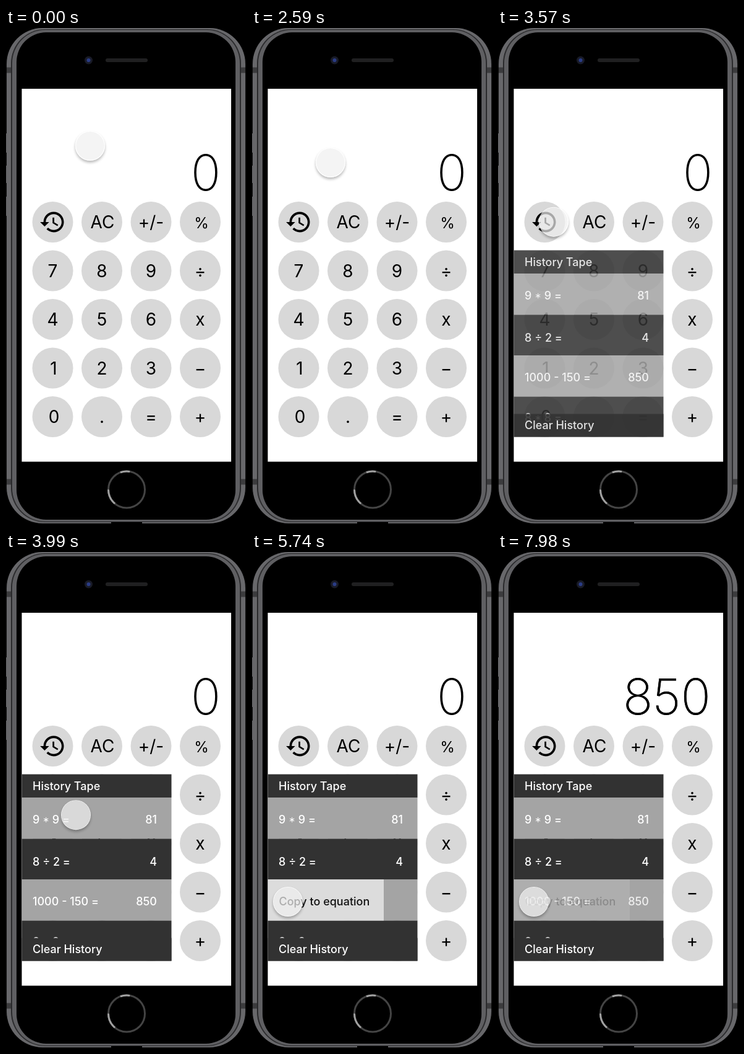
These frames come from a looping animation (388 by 800 pixels, 8000 ms). An HTML page:

```html
<!DOCTYPE html>
<html lang="en">
<head>
<meta charset="utf-8">
<title>Calculator history</title>
<style>
  html, body { margin: 0; width: 100%; height: 100%; overflow: hidden; background: #000; }
  svg { position: absolute; left: 0; top: 0; }
  text { font-family: Inter, Roboto, sans-serif; }
  .key { font-size: 28px; text-anchor: middle; }
  .display { font-size: 80px; font-weight: 200; }
  .tape text { font-size: 18px; font-weight: 500; fill: #fff; }
  .tape .value { text-anchor: end; }
  .times { font-size: 13px; baseline-shift: 2px; }
  #touch {
    position: absolute; left: -24px; top: -24px; width: 48px; height: 48px;
    box-sizing: border-box; border: 1.5px solid rgba(255, 255, 255, .85); border-radius: 50%;
    background: rgba(240, 240, 240, .7); background-clip: padding-box;
    box-shadow: 0 3px 4px rgba(0, 0, 0, .28);
  }
</style>
</head>
<body>
<svg width="388" height="800" viewBox="0 0 388 800">
  <defs>
    <clipPath id="screen"><rect x="25.5" y="98" width="338.5" height="601.5"/></clipPath>
  </defs>

  <!-- phone body -->
  <g fill="#58585b">
    <rect y="170" width="3" height="31"/><rect y="222" width="3" height="28"/><rect y="272" width="3" height="31"/>
  </g>
  <rect x="1" y="0" width="386" height="799" rx="58" fill="#68686b"/>
  <rect x="8" y="2" width="372" height="795" rx="55" fill="#2a2a2c"/>
  <rect x="10" y="3" width="368" height="793" rx="54" fill="#5f5f62"/>
  <rect x="17" y="7" width="354" height="786" rx="48"/>
  <path d="M1 68h7M380 68h7M1 732h7M380 732h7" stroke="#3c3c3e" stroke-width="9"/>
  <rect x="170" y="797" width="50" height="3"/>
  <circle cx="133.5" cy="52" r="6.5" fill="#191b27"/>
  <circle cx="133.5" cy="52" r="3" fill="#2a3c86"/>
  <rect x="161" y="49" width="68" height="6" rx="3" fill="#202021"/>
  <g fill="none" stroke-width="3">
    <circle cx="195" cy="744.5" r="29.5" stroke="#444"/>
    <circle cx="195" cy="744.5" r="29.5" stroke="#a0a0a0" pathLength="360" stroke-dasharray="0 130 50 70 30 80"/>
  </g>

  <g clip-path="url(#screen)">
    <rect x="25" y="98" width="340" height="602" fill="#fff"/>
    <g id="keys"></g>
    <text id="zero" class="display" x="347" y="262" text-anchor="end">0</text>
    <text id="flyLeft" class="display">850</text>
    <text id="flyRight" class="display">850</text>
    <g id="tape" class="tape"></g>
    <g id="copy">
      <rect x="25.5" y="528" width="187.5" height="66.5" fill="#dcdcdc"/>
      <text x="43.5" y="570" font-size="18" font-weight="500" fill="#111">Copy to equation</text>
    </g>
  </g>
</svg>
<div id="touch"></div>

<script>
const $ = id => document.getElementById(id);

// Keypad: the empty label is the history key
const labels = ['', 'AC', '+/-', '%', '7', '8', '9', '÷', '4', '5', '6', 'x',
                '1', '2', '3', '−', '0', '.', '=', '+'];
const nudge = { 'AC': 1, '%': 2, '1': 1.5, '0': 2 };
$('keys').innerHTML = labels.map((label, i) => {
  const x = 75.5 + i % 4 * 79.5, y = 313 + Math.floor(i / 4) * 78.5;
  const size = label === '%' ? ' style="font-size:24px"' : '';
  return `<circle cx="${x}" cy="${y}" r="33" fill="#d8d8d8"/>
    <text class="key" x="${x + (nudge[label] || 0)}" y="${y + 10}"${size}>${label}</text>`;
}).join('') + `<path transform="translate(53.3 291) scale(1.83)" d="M13 3c-4.97 0-9 4.03-9 9H1l3.89 3.89.07.14L9 12H6
  c0-3.87 3.13-7 7-7s7 3.13 7 7-3.13 7-7 7c-1.93 0-3.68-.79-4.94-2.06l-1.42 1.42C8.27 19.99 10.51 21 13 21
  c4.97 0 9-4.03 9-9s-4.03-9-9-9zm-1 5v5l4.28 2.54.72-1.21-3.5-2.08V8H12z"/>`;

// History tape: top, bottom, baseline, colour, label, value
const dark = '#323232', light = '#a4a4a4';
const times = '<tspan class="times">∗</tspan>';
const rows = [
  [358.5, 396, 384, dark, 'History Tape', ''],
  [396, 462.5, 437.5, light, `9 ${times} 9 =`, '81'],
  [462.5, 528, 506, dark, '8 ÷ 2 =', '4'],
  [528, 594.5, 569.5, light, '1000 - 150 =', '850'],
  [594.5, 659.5, 635, dark, `8 ${times} 8 =`, ''],
  [622.5, 659.5, 647, dark, 'Clear History', '']
];
$('tape').innerHTML = rows.map(([top, bottom, base, fill, label, value]) =>
  `<g><rect x="25.5" y="${top}" width="242" height="${bottom - top}" fill="${fill}"/>
    <text x="43" y="${base}">${label}</text>
    <text class="value" x="244" y="${base}">${value}</text></g>`).join('');
const layers = [...$('tape').children];
const swapped = layers[3].querySelectorAll('text');

// Touch path: time, x, y
const path = [
  [0, 136, 190], [350, 137, 187], [1050, 137, 187], [1540, 137, 190], [1750, 137, 190],
  [2590, 127, 217], [3220, 85, 298], [3430, 85, 298], [3990, 113, 424], [4760, 58, 564], [8000, 58, 564]
];

const lerp = (a, b, k) => a + (b - a) * k;
function ease(t, from, to) {
  const k = Math.min(1, Math.max(0, (t - from) / (to - from)));
  return k < .5 ? 2 * k * k : 1 - 2 * (1 - k) ** 2;
}

// Speed at a path point; zero next to a rest
function speed(i, axis) {
  const a = path[i - 1], b = path[i], c = path[i + 1];
  if (!a || !c || a[2] === b[2] || b[2] === c[2]) return 0;
  return (c[axis] - a[axis]) / (c[0] - a[0]);
}

function along(t, axis) {
  const i = path.findIndex(p => p[0] > t) - 1, a = path[i], b = path[i + 1];
  const span = b[0] - a[0], k = (t - a[0]) / span, m = 1 - k;
  return a[axis] * (1 + 2 * k) * m * m + b[axis] * k * k * (3 - 2 * k)
    + span * k * m * (speed(i, axis) * m - speed(i + 1, axis) * k);
}

function fly(el, startX, k) {
  const x = lerp(startX, 202, k), y = lerp(515, 262, k), size = lerp(.44, 1, k);
  el.setAttribute('transform', `translate(${x} ${y}) scale(${size})`);
  el.style.opacity = k ** 1.3;
}

function draw() {
  const t = performance.now() % 8000;
  $('touch').style.transform = `translate(${along(t, 1)}px, ${along(t, 2)}px)`;

  const shown = ease(t, 3210, 3700);
  layers.forEach(layer => [...layer.children].forEach(el => el.style.opacity = shown));

  const copy = ease(t, 5040, 5600) - ease(t, 7700, 8100);
  $('copy').style.opacity = copy;
  swapped.forEach(el => el.style.opacity = shown * (1 - copy));

  const k = ease(t, 6300, 7140);
  $('zero').style.opacity = 1 - ease(t, 6260, 6600);
  fly($('flyLeft'), 21, k);
  fly($('flyRight'), 355, k);
  requestAnimationFrame(draw);
}
draw();
</script>
</body>
</html>
```
